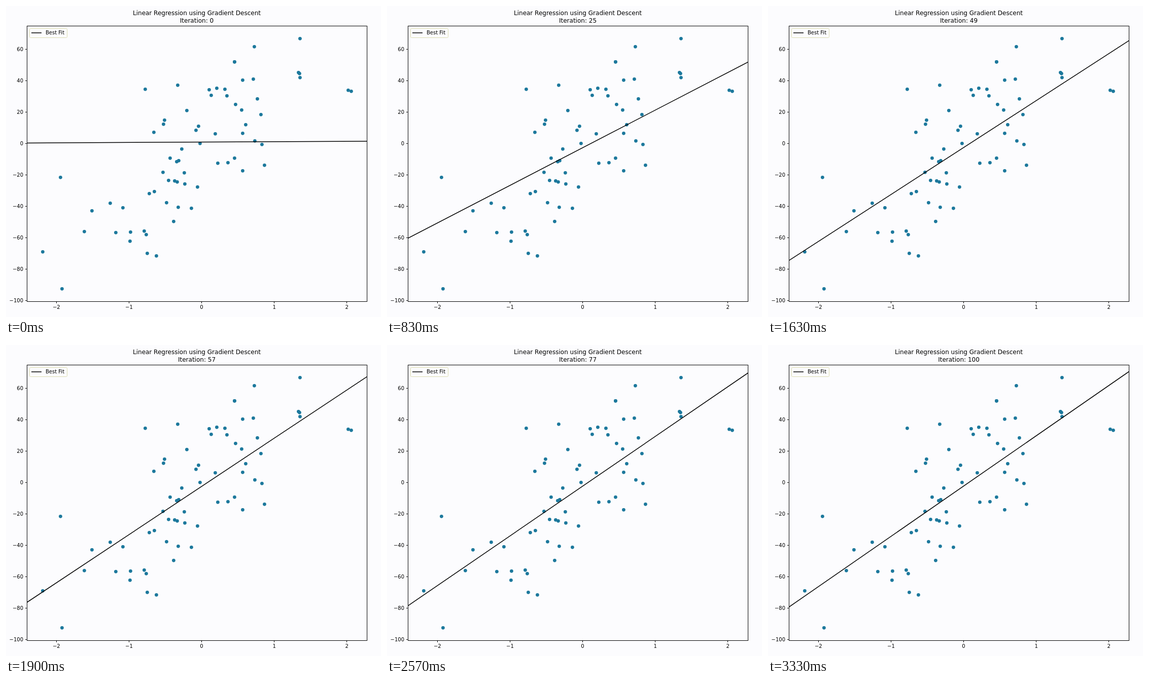
Recreate the animation shown at these times as an HTML page. Size 739 by 614 pixels, loop 3.36 s.

```html
<!DOCTYPE html>
<html lang="en">
<head>
<meta charset="utf-8">
<title>Linear Regression using Gradient Descent</title>
<style>
html, body { margin: 0; width: 100%; height: 100%; overflow: hidden; background: #fcfcfe; }
svg { display: block; font: 10px "DejaVu Sans", sans-serif; }
.title { font-size: 12px; text-anchor: middle; }
.axes { fill: none; stroke: #000; shape-rendering: crispEdges; }
.fit { stroke: #000; stroke-width: 1.5; }
</style>
</head>
<body>
<svg width="739" height="614" viewBox="0 0 739 614">
  <defs><clipPath id="plot"><rect x="41" y="39" width="671" height="545"/></clipPath></defs>
  <g id="dots" fill="#1c789c"></g>
  <path id="axes" class="axes"/>
  <g id="labels"></g>
  <line id="line" class="fit" x1="31" x2="721" clip-path="url(#plot)"/>
  <rect x="46.5" y="44.5" width="74" height="18" rx="2" fill="#fcfcfe" stroke="#dcdcb0"/>
  <path class="fit" d="M50 53H70"/>
  <text x="78" y="56.3">Best Fit</text>
  <text class="title" x="376" y="18">Linear Regression using Gradient Descent</text>
  <text class="title" x="376" y="33" id="counter"></text>
</svg>
<script>
const LOOP = 3360, STEPS = 100, RATE = 0.001;
const X0 = 385.5, Y0 = 271.2, X_UNIT = 143.1, Y_UNIT = 3.098;
const $ = id => document.getElementById(id);

// Samples as x, y pairs in pixels
const samples = [
  72,485, 110,558, 107,338, 154,445, 169,404, 205,389, 216,447, 230,398, 245,446, 244,464,
  272,444, 276,451, 278,488, 296,493, 282,370, 292,366, 309,328, 274,164, 291,249, 310,233,
  312,225, 338,156, 356,206, 374,245, 379,237, 382,271, 346,282, 323,300, 336,307, 340,305,
  320,344, 332,345, 337,347, 351,329, 352,351, 377,357, 316,388, 339,397, 365,399, 330,425,
  400,165, 404,176, 415,162, 431,164, 435,177, 412,252, 417,310, 437,309, 450,300, 466,325,
  466,251, 472,234, 464,205, 452,194, 466,146, 450,110, 450,110, 487,144, 489,80, 495,183,
  502,214, 490,266, 504,273, 509,314, 579,64, 576,131, 578,133, 579,141, 674,166, 680,168
];
const points = [];
for (let i = 0; i < samples.length; i += 2) points.push([samples[i], samples[i + 1]]);
$("dots").innerHTML = points.map(([x, y]) => `<circle cx="${x + 0.4}" cy="${y + 0.3}" r="3.4"/>`).join("");

// Axes, ticks and tick labels
let path = "M41.5 39.5H711.5V583.5H41.5Z", labels = "";
const label = (value, x, y, anchor) => {
  labels += `<text x="${x}" y="${y}" text-anchor="${anchor}">${String(value).replace("-", "\u2212")}</text>`;
};
for (let v = -2; v <= 2; v++) {
  const x = X0 + v * X_UNIT;
  path += `M${Math.floor(x) + 0.5} 584v3`;
  label(v, x, 598, "middle");
}
for (let v = -100; v <= 60; v += 20) {
  const y = Y0 - v * Y_UNIT;
  path += `M38 ${Math.floor(y) + 0.5}h3`;
  label(v, 34, y + 3.8, "end");
}
$("axes").setAttribute("d", path);
$("labels").innerHTML = labels;

// Gradient descent on the summed squared error
const fits = [];
for (let i = 0, offset = 268.7, slope = -0.7; i <= STEPS; i++) {
  fits.push({ offset, slope });
  let dOffset = 0, dSlope = 0;
  for (const [x, y] of points) {
    const u = (x + 0.3 - X0) / X_UNIT;
    const error = offset + slope * u - y;
    dOffset += error;
    dSlope += error * u;
  }
  offset -= RATE * dOffset;
  slope -= RATE * dSlope;
}

function draw(now) {
  const tick = Math.floor(now % LOOP / 10);
  const step = Math.min(STEPS, Math.floor((tick + 0.5) * 0.3));
  const { offset, slope } = fits[step];
  for (const n of [1, 2]) {
    const x = +$("line").getAttribute("x" + n);
    $("line").setAttribute("y" + n, offset + slope * (x - X0) / X_UNIT);
  }
  $("counter").textContent = "Iteration: " + step;
  requestAnimationFrame(draw);
}
draw(performance.now());
</script>
</body>
</html>
```
